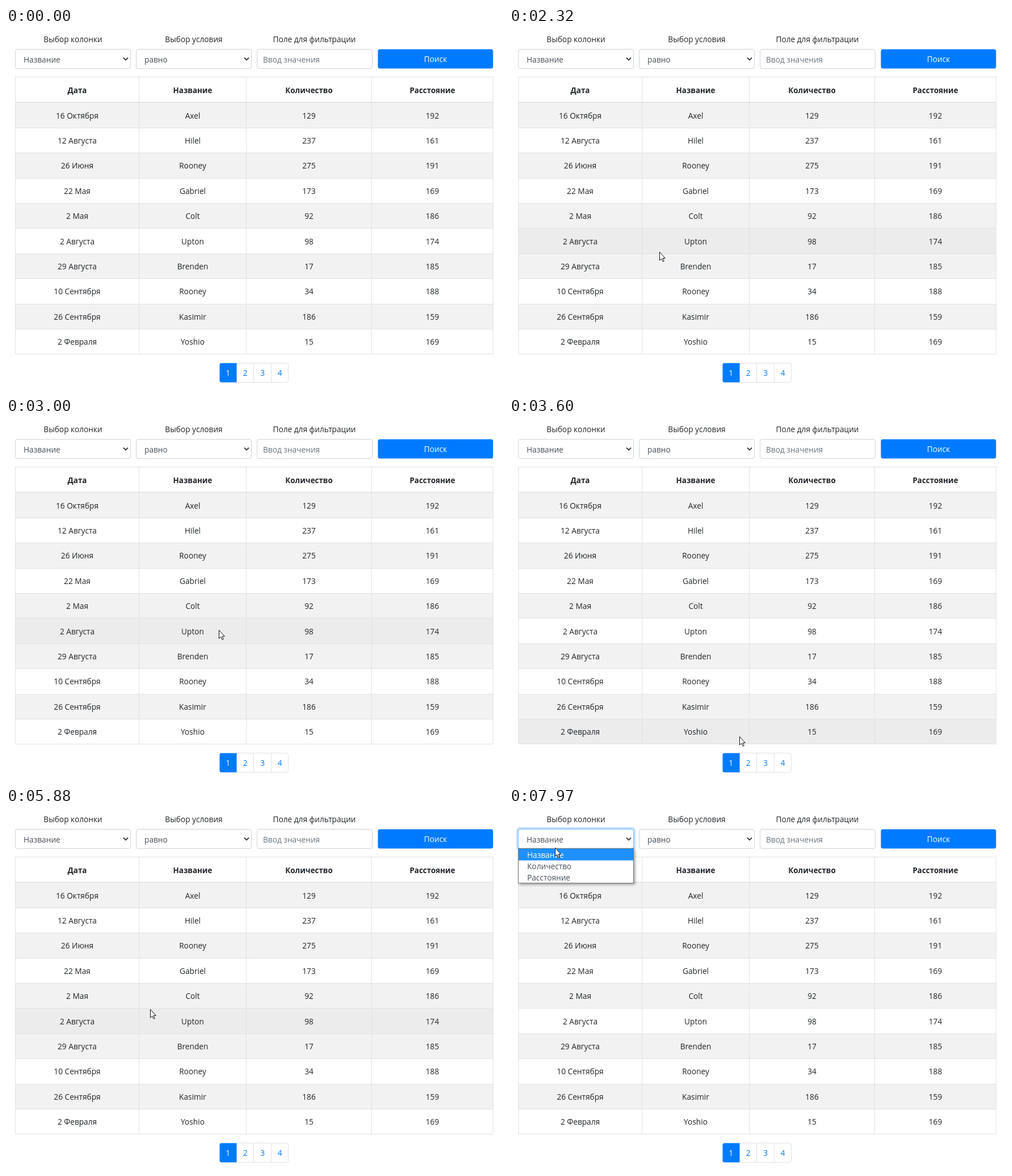
Write an HTML page with a canvas that moves like this. It is 876x639 px and loops after 8 s.

```html
<!DOCTYPE html>
<html lang="ru">
<head>
<meta charset="utf-8">
<title>Таблица</title>
<style>
  html, body { margin: 0; width: 100%; height: 100%; overflow: hidden; background: #fff; }
  canvas { display: block; }
</style>
</head>
<body>
<canvas id="stage" width="876" height="639"></canvas>
<script>
const ctx = document.getElementById('stage').getContext('2d');
const LOOP = 8000, STEP = 60;
const FONT = '"Open Sans", "Noto Sans", sans-serif';
const SIZE = 13.7, BOLD_SIZE = 13.4;
const INK = '#212529', BLUE = '#007bff', LINE = '#dee2e6', FIELD = '#ced4da', RING = '#bfdeff';
const ROW_TOP = 131.9, ROW_H = 44.4;
const HEADS = ['Дата', 'Название', 'Количество', 'Расстояние'];
const PAGER = [376, 406.5, 437, 467.5, 498];

const WIDE = [16, 234, 423, 644, 858], NARROW = [16, 226, 417, 641, 858];
const parse = text => text.split(';').map(row => row.split(','));
const PAGES = [
  { cols: WIDE, rows: parse('16 Октября,Axel,129,192;12 Августа,Hilel,237,161;26 Июня,Rooney,275,191;22 Мая,Gabriel,173,169;2 Мая,Colt,92,186;2 Августа,Upton,98,174;29 Августа,Brenden,17,185;10 Сентября,Rooney,34,188;26 Сентября,Kasimir,186,159;2 Февраля,Yoshio,15,169') },
  { cols: WIDE, rows: parse('8 Марта,Oscar,214,178;19 Июля,Felix,87,165;3 Апреля,Simon,152,190;11 Сентября,Martin,246,157;24 Января,Lucas,61,183;6 Октября,Victor,198,172;17 Мая,Norman,133,168;28 Сентября,Adrian,45,194;9 Июня,Edgar,279,155;21 Августа,Conrad,106,181') },
  { cols: NARROW, rows: parse('22 Февраля,Wallace,291,175;27 Октября,Roth,99,162;25 Июня,Elmo,166,170;7 Мая,Emery,207,152;13 Января,Barry,127,192;18 Октября,Palmer,246,175;14 Февраля,Brady,127,173;31 Августа,Derek,63,179;14 Апреля,Hammett,268,187;15 Июля,Colton,263,193') },
  { cols: NARROW, rows: parse('5 Июня,Julian,183,166;20 Марта,Hugo,72,188;12 Апреля,Stephen,254,159;30 Июля,Leon,118,177;1 Октября,Marcus,229,184;16 Января,Philip,94,171;23 Мая,Arthur,141,153;7 Февраля,Dennis,265,190;18 Августа,Walter,38,163;29 Июня,Roland,202,185') }
];

// Pointer path: time, x, y
const PATH = [
  [660, 455, 632], [840, 340, 627], [1080, 200, 605], [1260, 90, 615], [1380, 35, 645],
  [1860, 150, 645], [2040, 205, 540], [2280, 265, 395], [2340, 265, 395], [2640, 300, 392],
  [2880, 368, 392], [3000, 375, 374], [3180, 384, 118], [3420, 402, 577], [3540, 405, 574],
  [3600, 406, 562], [3780, 422, 617], [4080, 424, 617], [4320, 452, 614], [4500, 454, 613],
  [4680, 485, 613], [4860, 485, 613], [5160, 394, 611], [5400, 392, 611], [5700, 300, 430],
  [5880, 254, 354.5], [6000, 43, 222], [6180, 62, 120], [6420, 74, 67], [7020, 74, 67],
  [7200, 81, 59], [7860, 81, 59], [7960, 81, 77], [8000, 81, 77]
];
const PAGE_CHANGES = [[3840, 1], [4440, 2], [4800, 3], [5340, 0]];
const CLICKS = [3780, 4380, 4740, 5280, 7050];
const CLICK_LENGTH = 150, FOCUS_LENGTH = 60, SELECT_FOCUS = 7050, MENU_OPENS = 7080, ROW_HOVER_ENDS = 6000;

const pageAt = t => PAGE_CHANGES.reduce((page, [at, next]) => t >= at ? next : page, 0);
const rowEdge = r => Math.floor(ROW_TOP + r * ROW_H);

function pointerAt(t) {
  const next = PATH.findIndex(([at]) => at > t);
  if (next < 1) return null;
  const [t0, x0, y0] = PATH[next - 1], [t1, x1, y1] = PATH[next];
  const k = (t - t0) / (t1 - t0);
  return { x: x0 + (x1 - x0) * k, y: y0 + (y1 - y0) * k };
}

function text(str, x, y, color = INK, align = 'center', bold = false) {
  ctx.font = bold ? `bold ${BOLD_SIZE}px ${FONT}` : `${SIZE}px ${FONT}`;
  ctx.textAlign = align;
  ctx.fillStyle = color;
  ctx.fillText(str, x, y + 5);
}

function rect(x, y, w, h, color) {
  ctx.fillStyle = color;
  ctx.fillRect(x, y, w, h);
}

function box(x, y, w, h, radius, fill, stroke) {
  ctx.beginPath();
  ctx.roundRect(x, y, w, h, radius);
  ctx.fillStyle = fill;
  ctx.fill();
  if (!stroke) return;
  ctx.strokeStyle = stroke;
  ctx.lineWidth = 1;
  ctx.stroke();
}

function field(x, label, textX, color, focused) {
  if (focused) box(x - 3, 34, 210, 41, 6, RING);
  box(x + .5, 37.5, 203, 34, 3.5, '#fff', focused ? '#80bdff' : FIELD);
  text(label, textX, 55.5, color, 'left');
}

function chevron(x) {
  ctx.beginPath();
  ctx.moveTo(x - 4, 52.5);
  ctx.lineTo(x, 56.5);
  ctx.lineTo(x + 4, 52.5);
  ctx.strokeStyle = '#343a40';
  ctx.lineWidth = 1.8;
  ctx.stroke();
}

function drawForm(focused) {
  text('Выбор колонки', 118, 19.5);
  text('Выбор условия', 331, 19.5);
  text('Поле для фильтрации', 543.5, 19.5);
  field(16, 'Название', 31, '#495057', focused);
  chevron(211);
  field(229, 'равно', 244, '#495057');
  chevron(424);
  field(442, 'Ввод значения', 453, '#6c757d');
  box(655.5, 37.5, 203, 34, 3.5, BLUE);
  text('Поиск', 757, 55, '#fff');
}

function drawTable({ cols, rows }, hoverRow) {
  const center = i => (cols[i] + cols[i + 1] + 1) / 2;
  HEADS.forEach((head, i) => text(head, center(i), 109.5, INK, 'center', true));
  rows.forEach((row, r) => {
    const top = rowEdge(r) + 1, bottom = rowEdge(r + 1);
    rect(16, top, 843, bottom - top, r === hoverRow ? '#ececec' : r % 2 ? '#fff' : '#f2f2f2');
    rect(16, bottom, 843, 1, LINE);
    row.forEach((cell, i) => text(cell, center(i), ROW_TOP + (r + .5) * ROW_H + .5));
  });
  rect(16, 86, 843, 1, LINE);
  rect(16, 130.5, 843, 1.5, LINE);
  cols.forEach(x => rect(x, 86, 1, 490, LINE));
}

function drawPager(page, hover, focused) {
  const layer = i => i === page ? 2 : i === hover ? 1 : 0;
  for (const i of [0, 1, 2, 3].sort((a, b) => layer(a) - layer(b))) {
    const x = Math.round(PAGER[i]), w = Math.round(PAGER[i + 1]) - x;
    const active = i === page, over = i === hover && !active;
    const radius = i === 0 ? [3.5, 0, 0, 3.5] : i === 3 ? [0, 3.5, 3.5, 0] : 0;
    const left = i ? x - .5 : x + .5;
    if (over && focused) box(x - 3, 588, w + 6, 41, 4, RING);
    const fill = active ? BLUE : over ? '#e9ecef' : '#fff';
    box(left, 591.5, x + w - .5 - left, 34, radius, fill, active ? null : LINE);
    text(i + 1, (PAGER[i] + PAGER[i + 1]) / 2, 608.5, active ? '#fff' : over ? '#0056b3' : BLUE);
  }
}

function drawMenu() {
  ctx.save();
  ctx.shadowColor = 'rgba(0,0,0,.4)';
  ctx.shadowBlur = 5;
  ctx.shadowOffsetX = ctx.shadowOffsetY = 2;
  rect(16, 71, 204, 62, '#767676');
  ctx.restore();
  rect(17, 72, 202, 60, '#fff');
  rect(17, 72, 202, 20.5, '#1e90ff');
  HEADS.slice(1).forEach((name, i) => text(name, 32, 83 + i * 20, i ? '#495057' : '#fff', 'left'));
}

const ARROW = new Path2D('M.5 .5V15.2L3.8 12.2L6.2 17.3L8.3 16.4L6 11.4H10.3Z');
const HAND = new Path2D('M-1.2 10V1.8Q-1.2 .2 .3 .2T1.8 1.8V7Q4.4 4.8 4.6 6.2V7.6Q7.2 5.6 7.4 7.2V8.4Q10.2 6.8 10.2 9.8V14Q10.2 17.5 8 19.4V22H-.2V19.6L-4.2 13.6Q-5.6 11.6-4.2 11Q-3.2 10.2-1.2 12.4Z');
const FINGERS = new Path2D('M1.8 7V11.5M4.6 7V11.5M7.4 7V11.5');

function drawPointer({ x, y }, hand, clicked) {
  if (clicked) {
    ctx.beginPath();
    ctx.arc(x, y + .5, 11, 0, 7);
    ctx.fillStyle = 'rgba(255,255,0,.5)';
    ctx.fill();
  }
  ctx.save();
  ctx.translate(Math.round(x), Math.round(y));
  ctx.fillStyle = '#fff';
  ctx.strokeStyle = '#111';
  ctx.lineWidth = 1;
  ctx.lineJoin = 'round';
  const shape = hand ? HAND : ARROW;
  ctx.fill(shape);
  ctx.stroke(shape);
  if (hand) ctx.stroke(FINGERS);
  ctx.restore();
}

function draw(t) {
  const pointer = pointerAt(t - t % STEP);
  const page = pageAt(t);
  const clickedFor = length => CLICKS.some(at => t >= at && t < at + length);
  const onPager = pointer && pointer.y > 591 && pointer.y < 625 && pointer.x > 376 && pointer.x < 498;
  const hoverPage = onPager ? PAGER.findIndex(x => x > pointer.x) - 1 : -1;
  const hoverRow = pointer && t < ROW_HOVER_ENDS ? Math.floor((pointer.y - ROW_TOP) / ROW_H) : -1;

  rect(0, 0, 876, 639, '#fff');
  drawForm(t >= SELECT_FOCUS);
  drawTable(PAGES[page], hoverRow);
  drawPager(page, hoverPage, clickedFor(FOCUS_LENGTH));
  if (t >= MENU_OPENS) drawMenu();
  if (pointer) drawPointer(pointer, onPager, clickedFor(CLICK_LENGTH));
}

const start = performance.now();
function tick() {
  draw((performance.now() - start) % LOOP);
  requestAnimationFrame(tick);
}
tick();
</script>
</body>
</html>
```
